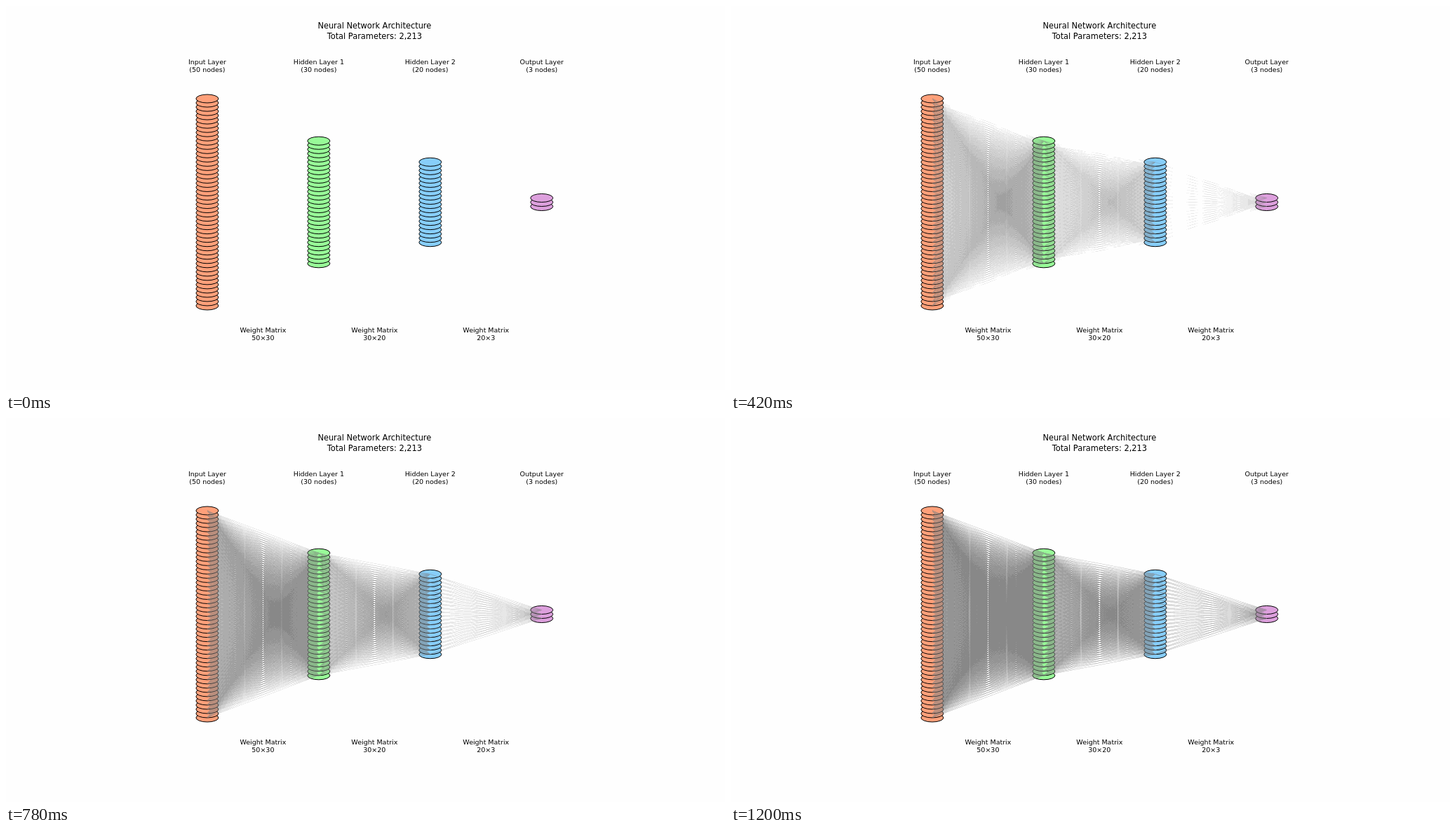
An HTML page with a canvas that plays this animation: 1025x547 px, repeating every 2.52 s.

```html
<!DOCTYPE html>
<html lang="en">
<head>
<meta charset="utf-8">
<title>Neural Network Architecture</title>
<style>
  html, body { margin: 0; width: 100%; height: 100%; overflow: hidden; background: #fefefe; }
  svg, canvas { position: absolute; display: block; }
  svg { left: 0; top: 0; }
  text { font: 9.49px "DejaVu Sans", sans-serif; text-anchor: middle; fill: #000; }
  .title { font-size: 11.39px; }
  ellipse { stroke: #000; stroke-width: 1; }
</style>
</head>
<body>
<svg id="scene" width="1025" height="547" viewBox="0 0 1025 547"></svg>
<canvas id="links" width="490" height="315" style="left:280px;top:120px"></canvas>
<script>
const LEFT = 280, TOP = 120, W = 490, H = 315;
const MID_Y = 279.5, PITCH = 6.02, RX = 16, RY = 6;
const STEP_MS = 60, STEPS = 20, LOOP_MS = 2520;
const MAX_ALPHA = 0.45, LINE_WIDTH = 0.475;
const PAPER = 254, GRAY = 128;

const layers = [
  { name: 'Input Layer', count: 50, fill: '#ffa07a' },
  { name: 'Hidden Layer 1', count: 30, fill: '#98fb98' },
  { name: 'Hidden Layer 2', count: 20, fill: '#87cefa' },
  { name: 'Output Layer', count: 3, fill: '#dda0dd' }
];
layers.forEach((layer, i) => { layer.x = 286.9 + 158.95 * i; });

const nodeY = (layer, i) => MID_Y + (i - (layer.count - 1) / 2) * PITCH;

const scene = document.getElementById('scene');
function add(tag, attrs, content = '') {
  const el = document.createElementNS('http://www.w3.org/2000/svg', tag);
  for (const key in attrs) el.setAttribute(key, attrs[key]);
  el.textContent = content;
  scene.append(el);
}

function drawScene() {
  const mid = (layers[0].x + layers[3].x) / 2;
  add('text', { x: mid, y: 32.2, class: 'title' }, 'Neural Network Architecture');
  add('text', { x: mid, y: 46.6, class: 'title' }, 'Total Parameters: 2,213');
  layers.forEach((layer, k) => {
    add('text', { x: layer.x, y: 83 }, layer.name);
    add('text', { x: layer.x, y: 94 }, `(${layer.count} nodes)`);
    for (let i = layer.count - 1; i >= 0; i--) {
      add('ellipse', { cx: layer.x, cy: nodeY(layer, i), rx: RX, ry: RY, fill: layer.fill });
    }
    const next = layers[k + 1];
    if (!next) return;
    const x = (layer.x + next.x) / 2;
    add('text', { x, y: 464.6 }, 'Weight Matrix');
    add('text', { x, y: 475.6 }, `${layer.count}×${next.count}`);
  });
}

// Summed line coverage per pixel, shared by every step.
const density = new Float32Array(W * H);

function addLine(x0, y0, x1, y1) {
  const sub = 4;
  const slope = (y1 - y0) / (x1 - x0);
  const half = LINE_WIDTH * Math.hypot(1, slope) / 2;
  for (let x = x0 + 0.5 / sub; x < x1; x += 1 / sub) {
    const y = y0 + (x - x0) * slope - TOP;
    const col = Math.floor(x - LEFT);
    for (let row = Math.floor(y - half); row < y + half; row++) {
      const cover = Math.min(row + 1, y + half) - Math.max(row, y - half);
      density[row * W + col] += cover / sub;
    }
  }
}

function connect(a, b) {
  for (let i = 0; i < a.count; i++) {
    for (let j = 0; j < b.count; j++) addLine(a.x, nodeY(a, i), b.x, nodeY(b, j));
  }
}

function insideNode(x, y) {
  return layers.some(layer => {
    const dx = (x - layer.x) / RX;
    if (Math.abs(dx) >= 1) return false;
    const nearest = Math.round((y - nodeY(layer, 0)) / PITCH);
    const i = Math.max(0, Math.min(layer.count - 1, nearest));
    return Math.hypot(dx, (y - nodeY(layer, i)) / RY) < 1;
  });
}

// Flat gray bands on paper; the lightest tints fall back to white.
function band(shade) {
  const level = PAPER - shade * (PAPER - GRAY);
  if (level > 243) return 0;
  const snapped = Math.max(136, 232 - 12 * Math.round((232 - level) / 12));
  return (PAPER - snapped) / (PAPER - GRAY);
}

drawScene();
for (let k = 0; k < 3; k++) connect(layers[k], layers[k + 1]);

const overNode = new Uint8Array(W * H);
for (let p = 0; p < W * H; p++) {
  overNode[p] = insideNode(LEFT + p % W + 0.5, TOP + Math.floor(p / W) + 0.5) ? 1 : 0;
}

const ctx = document.getElementById('links').getContext('2d');
const image = ctx.createImageData(W, H);
image.data.fill(GRAY);

function drawLinks(step) {
  const clear = 1 - MAX_ALPHA * step / STEPS;
  for (let p = 0; p < W * H; p++) {
    let shade = 0;
    if (density[p] > 0) {
      shade = 1 - Math.pow(clear, density[p]);
      shade = overNode[p] ? Math.min(shade, 0.55) : band(shade);
    }
    image.data[p * 4 + 3] = Math.round(shade * 255);
  }
  ctx.putImageData(image, 0, 0);
}

let shown = -1;
const start = performance.now();
function tick() {
  const time = (performance.now() - start) % LOOP_MS;
  const step = Math.min(STEPS, Math.floor(time / STEP_MS));
  if (step !== shown) drawLinks(shown = step);
  requestAnimationFrame(tick);
}
tick();
</script>
</body>
</html>
```
